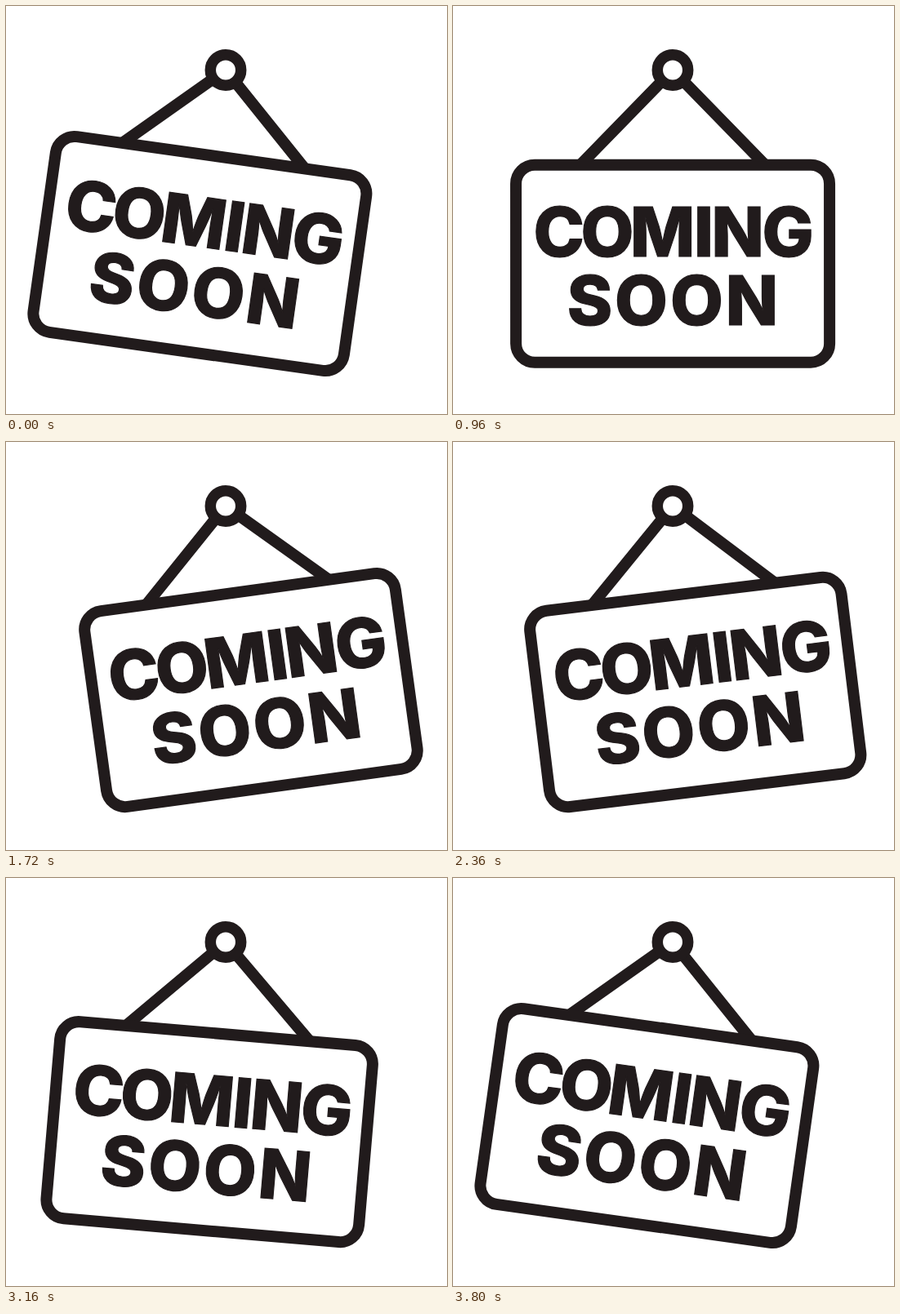
Write an HTML page that moves like this. It is 540x500 px and loops after 3.84 s.

```html
<!DOCTYPE html>
<html lang="en">
<head>
<meta charset="utf-8">
<title>Coming soon</title>
<style>
  @property --tilt {
    syntax: '<number>';
    inherits: true;
    initial-value: 8;
  }

  html, body {
    margin: 0;
    width: 100%;
    height: 100%;
    overflow: hidden;
    background: #fff;
  }

  svg { display: block; }

  .line {
    fill: none;
    stroke: #211b1c;
    stroke-width: 14;
  }

  /* The sign hangs from the ring and rises with the square of its tilt. */
  .swing {
    --lift: calc(var(--tilt) * var(--tilt) * 0.156);
    transform: rotate(calc(var(--tilt) * 1deg));
    animation: swing 1920ms cubic-bezier(.6, 0, .4, 1) infinite alternate;
  }

  .strings { transform: scaleY(calc(1 - var(--lift) / 117.2)); }
  .strings path { vector-effect: non-scaling-stroke; }
  .board { transform: translateY(calc(237.2px - var(--lift) * 1px)); }

  text {
    font: 800 84px Inter, Arial, sans-serif;
    font-optical-sizing: none;
    text-anchor: middle;
    fill: #211b1c;
    stroke: #211b1c;
    stroke-width: 1.2;
  }

  .top { letter-spacing: -4.4px; }
  .bottom { letter-spacing: 2.9px; }

  @keyframes swing {
    from { --tilt: 8; }
    to { --tilt: -8; }
  }
</style>
</head>
<body>
<svg width="540" height="500" viewBox="0 0 540 500">
  <g transform="translate(269 78.5)">
    <g class="swing">
      <g class="strings">
        <path class="line" d="M-114 117.2L0 0L114 117.2"/>
      </g>
      <g class="board">
        <rect class="line" x="-192" y="-121" width="384" height="242" rx="23"/>
        <text class="top" x="-1.2" y="-8.4" dx="0 0 0 3 2 2">COMING</text>
        <text class="bottom" x="1.2" y="75.2">SOON</text>
      </g>
    </g>
    <circle class="line" r="18.7" style="fill: #fff; stroke-width: 13.5"/>
  </g>
</svg>
</body>
</html>
```
